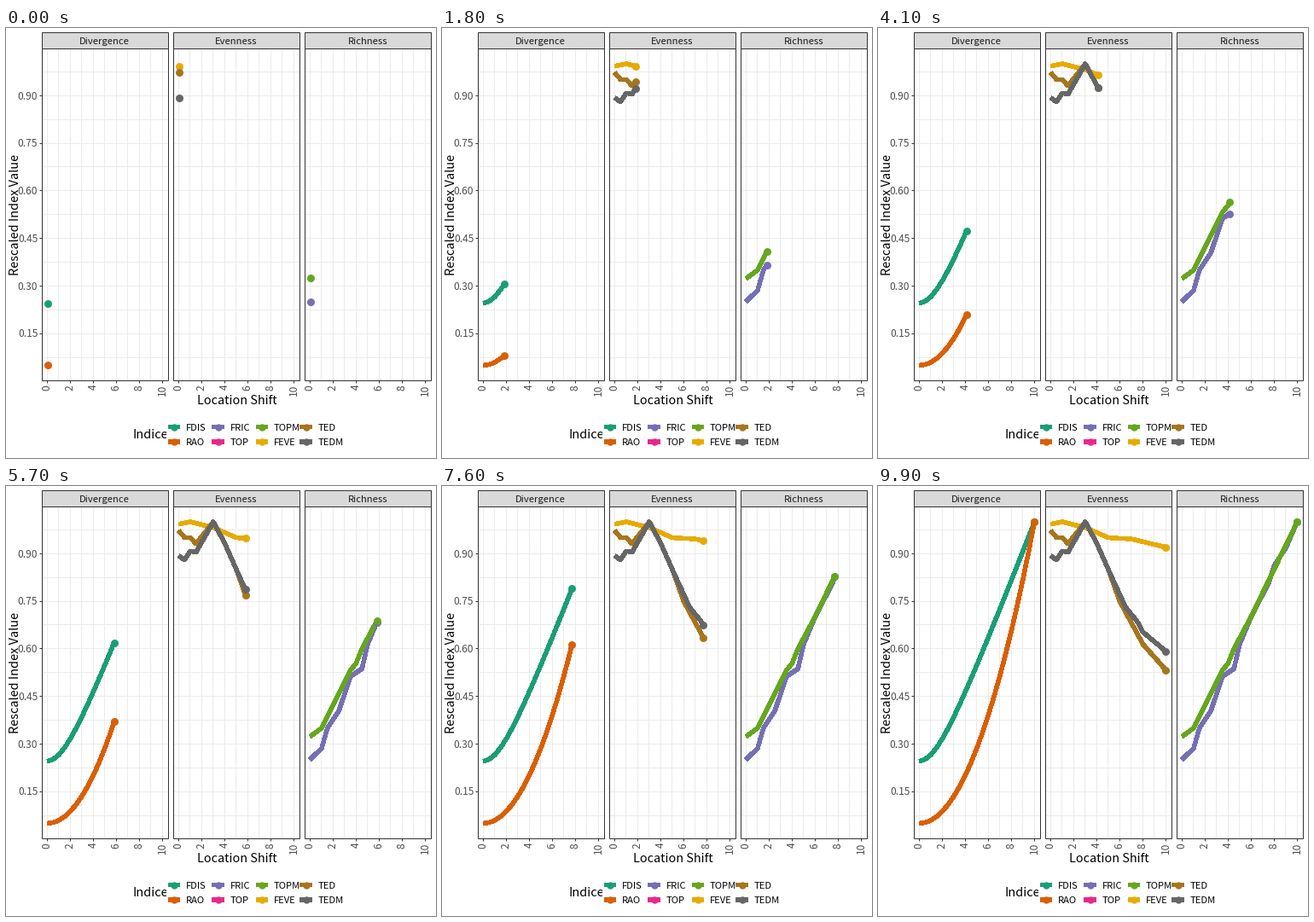
Animation, 504 px wide and 504 px high, one loop 10 s. Source, as a matplotlib script:

```python
import numpy as np
import matplotlib.pyplot as plt
from matplotlib.animation import FuncAnimation
from matplotlib.patches import Rectangle

SIZE, FRAMES = 504, 100
X0, UNIT = 48.5, 13.49          # first x tick and pixels per x unit
PANEL_STEP, LEFT, WIDTH = 154, 42.5, 148
TOP, BOTTOM = 24.5, 413.5
GRID, BORDER, TICK = "#EBEBEB", "#333333", "#4D4D4D"

COLORS = {
    "FDIS": "#1B9E77", "RAO": "#D95F02", "FRIC": "#7570B3", "TOP": "#E7298A",
    "TOPM": "#66A61E", "FEVE": "#E6AB02", "TED": "#A6761D", "TEDM": "#666666",
}


def through(*points):
    """Piecewise linear curve through a few (x, value) corners."""
    px, pv = zip(*points)
    return lambda x: np.interp(x, px, pv)


PEAK = [(3, 1), (4, 0.932), (5, 0.85)]
PANELS = {
    "Divergence": {
        "FDIS": lambda x: np.sqrt(0.0605 + 0.9395 * (x / 10) ** 1.96),
        "RAO": lambda x: 0.05 + 0.95 * (x / 10) ** 2,
    },
    "Evenness": {
        "FEVE": through((0, 0.993), (1, 1), (3, 0.982), (5, 0.95),
                        (7, 0.946), (10, 0.92)),
        "TED": through((0, 0.972), (0.5, 0.951), (1, 0.95), (1.5, 0.931),
                       *PEAK, (6, 0.749), (8, 0.615), (10, 0.533)),
        "TEDM": through((0, 0.893), (0.5, 0.88), (1, 0.908), (1.5, 0.904),
                        *PEAK, (6.5, 0.731), (7.5, 0.687), (8, 0.653),
                        (10, 0.592)),
    },
    "Richness": {
        "FRIC": through((0, 0.251), (1, 0.287), (1.5, 0.35), (2.5, 0.405),
                        (3.5, 0.513), (4.5, 0.537), (5, 0.615), (6, 0.701),
                        (7.5, 0.806), (8, 0.862), (9, 0.917), (10, 1)),
        "TOPM": through((0, 0.324), (1, 0.35), (2, 0.422), (3.5, 0.532),
                        (4, 0.555), (4.5, 0.6), (6, 0.702), (10, 1)),
    },
}

plt.rcParams["font.family"] = ["Noto Sans CJK JP", "DejaVu Sans"]
fig = plt.figure(figsize=(SIZE / 72, SIZE / 72), dpi=72, facecolor="white")
ax = fig.add_axes([0, 0, 1, 1])
ax.set(xlim=(0, SIZE), ylim=(SIZE, 0))
ax.axis("off")


def y_of(value):
    return 79.2 + (0.9 - value) * 372


def rule(xs, ys, color):
    """Thin line on whole pixels."""
    ax.plot(xs, ys, color=color, lw=1, zorder=1, snap=False,
            solid_capstyle="butt")


def pixel(v):
    return np.floor(v) + 0.5


def box(x, y, w, h, fc="none"):
    ax.add_patch(Rectangle((x, y), w, h, fc=fc, ec=BORDER, lw=1,
                           zorder=6, snap=False))


def label(x, y, text, size, color="black", **kw):
    kw = {"ha": "left", "va": "baseline", "zorder": 7, **kw}
    ax.text(x, y, text, fontsize=size, color=color, **kw)


def stroke(xs, ys, color, lw, z):
    return ax.plot(xs, ys, color=color, lw=lw, zorder=z, antialiased=False,
                   snap=False, solid_capstyle="butt",
                   solid_joinstyle="round")[0]


def dot(x, y, color, size, z):
    return ax.plot([x], [y], "o", ms=size, mew=0, color=color, zorder=z,
                   antialiased=False, snap=False)[0]


def draw_panel(left, title):
    for v in np.arange(1, 14) * 0.075:
        rule([left, left + WIDTH], [pixel(y_of(v))] * 2, GRID)
    for v in range(11):
        x = pixel(X0 + left - LEFT + v * UNIT)
        rule([x, x], [TOP, BOTTOM], GRID)
        if v % 2 == 0:
            rule([x, x], [BOTTOM, BOTTOM + 3], BORDER)
            label(x - 0.5, 418, str(v), 12, TICK, rotation=90,
                  ha="center", va="top")
    box(left, TOP, WIDTH, BOTTOM - TOP)
    box(left, 5.5, WIDTH, TOP - 5.5, fc="#D9D9D9")
    label(left + WIDTH / 2 - 0.7, 19, title, 11.2, "#1A1A1A", ha="center")


def draw_legend():
    label(149, 481, "Indices", 14.5, zorder=1)
    for i, (name, color) in enumerate(COLORS.items()):
        x, y = 197 + 51.5 * (i // 2), 467.5 + 17.4 * (i % 2)
        label(x + 14, y + 4, name, 11.2, zorder=2)
        ax.add_patch(Rectangle((x - 8.6, y - 8.6), 17.2, 17.2,
                               fc="white", ec="none", zorder=3))
        stroke([x - 6.9, x + 6.9], [y, y], color, 4.3, 4)
        dot(x, y, color, 8.4, 5)


X = np.linspace(0, 10, 21)
tracks = []
for p, (title, series) in enumerate(PANELS.items()):
    draw_panel(LEFT + p * PANEL_STEP, title)
    for name, curve in series.items():
        xs, ys = X0 + p * PANEL_STEP + X * UNIT, y_of(curve(X))
        line = stroke([], [], COLORS[name], 4.5, 3)
        head = dot(xs[0], ys[0], COLORS[name], 9, 4)
        tracks.append((xs, ys, line, head))

for v in np.arange(1, 7) * 0.15:
    rule([LEFT - 3, LEFT], [pixel(y_of(v))] * 2, BORDER)
    label(37.3, y_of(v) + 4.3, f"{v:.2f}", 12, TICK, ha="right")
label(15, 218.5, "Rescaled Index Value", 14.5, rotation=90,
      rotation_mode="anchor", ha="center")
label(270.5, 441, "Location Shift", 14.4, ha="center")
draw_legend()

# Each data point is reached on a whole frame
STEPS = np.arange(len(X))
ARRIVALS = np.round(STEPS * (FRAMES - 1) / 20)


def update(n):
    t = np.interp(n, ARRIVALS, STEPS)
    passed = STEPS < t
    for xs, ys, line, head in tracks:
        hx, hy = (np.interp(t, STEPS, c) for c in (xs, ys))
        line.set_data(np.append(xs[passed], hx), np.append(ys[passed], hy))
        head.set_data([hx], [hy])
    return [a for track in tracks for a in track[2:]]


anim = FuncAnimation(fig, update, frames=FRAMES, interval=100,
                     repeat=True, repeat_delay=0, blit=False)
plt.show()
```
